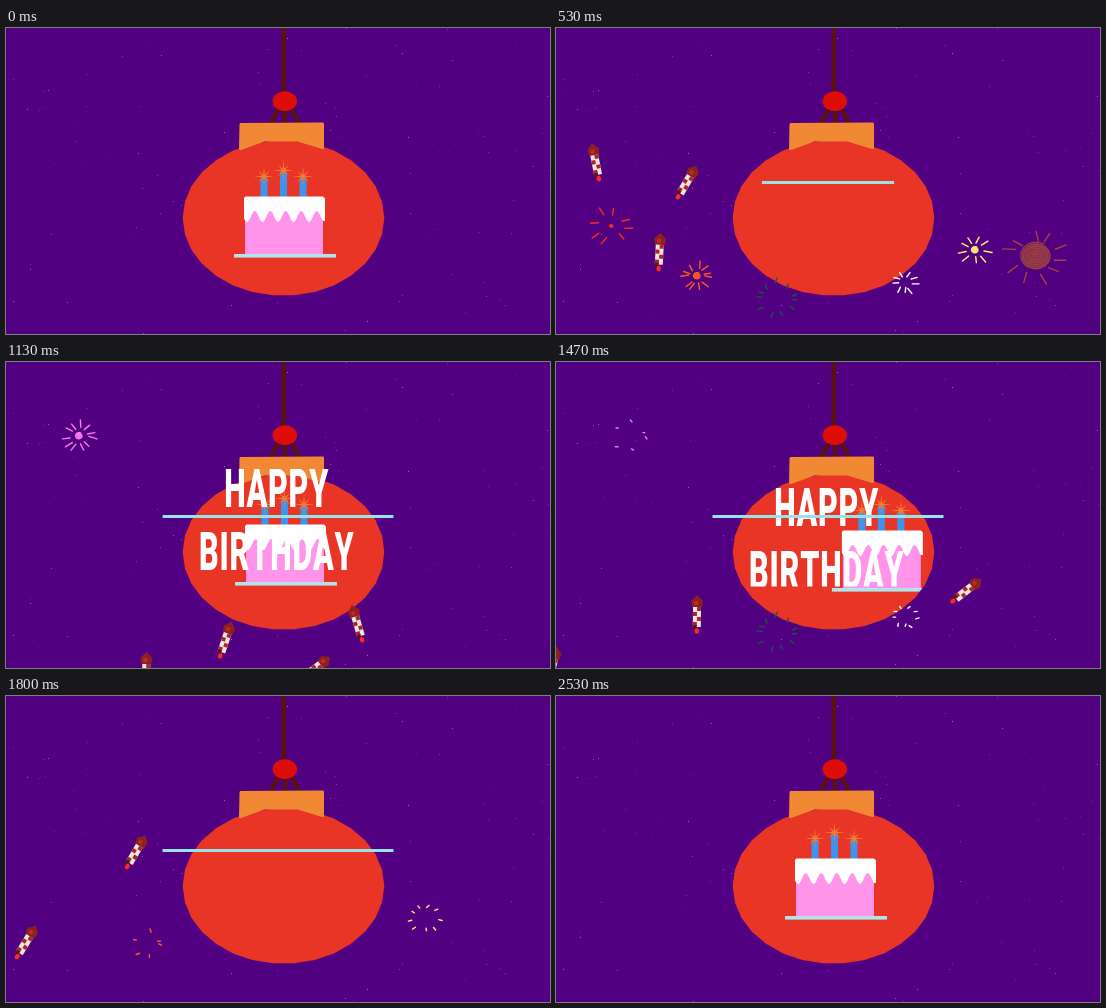
An HTML page with a canvas that plays this animation: 544x306 px, repeating every 2.59 s.

```html
<!DOCTYPE html>
<html lang="en">
<head>
<meta charset="utf-8">
<title>Happy Birthday</title>
<style>
  html, body { margin: 0; width: 100%; height: 100%; overflow: hidden; background: #520082; }
  canvas { display: block; width: 544px; height: 306px; }
</style>
</head>
<body>
<canvas id="stage" width="544" height="306"></canvas>
<script>
const ctx = document.getElementById('stage').getContext('2d');
const LOOP = 2590, STEP = 1000 / 15, HALF = LOOP / 2;
const HELD = [16, 28];
const BURST_LIFE = 430, FIRST_LAUNCH = 90, GROUND = 325, SQUASH = 0.88;
const TAU = Math.PI * 2;

const clamp = v => Math.min(1, Math.max(0, v));
const smooth = v => { v = clamp(v); return v * v * (3 - 2 * v); };
const mix = (a, b, u) => a + (b - a) * u;
const times = (n, make) => Array.from({ length: n }, (_, i) => make(i));
const polar = (x, y, a, rx, ry = rx) => [x + rx * Math.cos(a), y + ry * Math.sin(a)];

function seeded(seed) {
  return () => {
    seed = (seed * 1664525 + 1013904223) >>> 0;
    return seed / 4294967296;
  };
}

function trace(points) {
  ctx.beginPath();
  points.forEach(([x, y]) => ctx.lineTo(x, y));
}

function shape(color, points) {
  ctx.fillStyle = color;
  trace(points);
  ctx.fill();
}

function stroke(color, width, points) {
  ctx.strokeStyle = color;
  ctx.lineWidth = width;
  trace(points);
  ctx.stroke();
}

function oval(color, x, y, rx, ry = rx) {
  ctx.fillStyle = color;
  ctx.beginPath();
  ctx.ellipse(x, y, rx, ry, 0, 0, TAU);
  ctx.fill();
}

function rect(color, x, y, w, h) {
  ctx.fillStyle = color;
  ctx.fillRect(x, y, w, h);
}

const starRandom = seeded(41);
const stars = times(240, () => ({
  x: Math.floor(starRandom() * 544),
  y: Math.floor(starRandom() * 306),
  glow: 0.08 + starRandom() ** 4 * 0.5
}));

const bauble = times(30, i => polar(277.5, 190, i / 30 * TAU, 100.8, 77.8));

// A rocket rises from `from` on the ground, swaying sideways, and bursts at x, y.
const fireworks = [
  { color: '#f52a18', x: 55, y: 198, r: 24, rays: 8, core: 2, from: -8, sway: -12, flight: 740, bursts: [400, 2080] },
  { color: '#ff5a20', x: 141, y: 248, r: 17, rays: 11, core: 4, from: 140, sway: 0, flight: 450, bursts: [490, 1490] },
  { color: '#16564a', x: 222, y: 270, r: 23, rays: 11, core: 0, from: 204, sway: 0, flight: 400, bursts: [250, 1190] },
  { color: '#ffffff', x: 349, y: 254, r: 14, rays: 9, core: 0, from: 358, sway: 4, flight: 350, bursts: [480, 1170] },
  { color: '#ffee70', x: 419, y: 222, r: 18, rays: 9, core: 4, from: 285, sway: 0, flight: 440, bursts: [490, 1495] },
  { color: '#a0453c', x: 480, y: 228, r: 33, rays: 10, core: 16, from: 420, sway: 0, flight: 340, bursts: [430] },
  { color: '#3a35e6', x: 37, y: 121, r: 24, rays: 10, core: 2, from: 40, sway: 12, flight: 420, bursts: [560] },
  { color: '#22f060', x: 152, y: 120, r: 18, rays: 13, core: 0, from: 85, sway: -20, flight: 400, bursts: [600, 1870] },
  { color: '#ff78e8', x: 73, y: 74, r: 18, rays: 11, core: 4, from: 84, sway: 25, flight: 900, bursts: [1070] }
];

function drawRocket(x, y, angle) {
  ctx.save();
  ctx.translate(x, y);
  ctx.rotate(angle);
  shape('#8a2020', [[0, -19], [6, -13], [5, -7], [-5, -7], [-6, -13]]);
  rect('#c02a22', -3, -13, 4, 4);
  rect('#eee4e2', -4, -7, 8, 20);
  times(4, row => rect('#a82824', row % 2 ? -4 : 0, -7 + row * 5, 4, 4));
  rect('#5a1420', -4, 11, 4, 4);
  oval('#ff2a1c', 0, 17, 2.2, 2.8);
  ctx.restore();
}

function flyRocket(fw, u) {
  const x = mix(fw.from, fw.x, u) + fw.sway * Math.sin(Math.PI * u);
  const drift = fw.x - fw.from + fw.sway * Math.PI * Math.cos(Math.PI * u);
  drawRocket(x, mix(GROUND, fw.y, u), Math.atan2(drift, GROUND - fw.y));
}

function drawBurst(fw, u, seed) {
  const random = seeded(seed);
  const sparse = u > 0.72 && fw.core < 10;
  const inner = Math.max(0.48 + 0.45 * u, fw.core / fw.r + 0.15);
  times(fw.rays, i => {
    const a = (i + random() * 0.6) / fw.rays * TAU;
    const reach = fw.r * (0.8 + random() * 0.25);
    const bend = (random() - 0.5) * 0.3;
    if (sparse && i % 2) return;
    stroke(fw.color, 1.4, [
      polar(fw.x, fw.y, a + bend, reach * inner, reach * inner * SQUASH),
      polar(fw.x, fw.y, a, reach, reach * SQUASH)
    ]);
  });
  if (u < 0.35 && fw.core) drawScribble(fw);
}

function drawScribble({ color, x, y, core }) {
  const turns = 1.5 + core / 3;
  ctx.globalAlpha = 0.6;
  oval(color, x, y, core * 0.9, core * 0.8);
  ctx.globalAlpha = 1;
  stroke(color, 1.2, times(121, i => {
    const r = core * i / 120;
    return polar(x, y, i / 120 * turns * TAU, r, r * SQUASH);
  }));
}

function drawFireworks(t) {
  fireworks.forEach((fw, index) => fw.bursts.forEach(at => {
    const launch = Math.max(FIRST_LAUNCH, at - fw.flight);
    const rise = (t - launch) / (at - launch);
    const glow = (t - at) / BURST_LIFE;
    if (rise >= 0 && rise < 1) flyRocket(fw, rise);
    if (glow >= 0 && glow < 1) drawBurst(fw, glow, index * 97 + 13);
  }));
}

function drawOrnament() {
  rect('#5a120c', 275.5, 0, 4.5, 68);
  [-1, 0, 1].forEach(side =>
    stroke('#5a120c', 4.5, [[279 + side * 6, 80], [279 + side * 13.5, 94]]));
  oval('#de0d08', 278.8, 73.3, 12.2, 10);
  shape('#e83526', bauble);
  const cap = [[235, 96.5], [316.5, 96], [316.5, 119.5], [292, 112], [258, 112], [234.5, 120.5]];
  shape('#f08834', cap);
  stroke('#f08834', 3, [...cap, cap[0]]);
}

function drawSpark(x, y) {
  shape('#f07c34', times(16, i =>
    polar(x, y, i / 16 * TAU, i % 2 ? 2 : i % 4 ? 8 : 10.5)));
}

function drawCake(t) {
  const phase = t % HALF;
  const leaving = phase < HALF / 2;
  const x = leaving ? 48 * (phase / 172) ** 1.3
    : 1 - 91 * (Math.max(0, 1130 - phase) / 330) ** 1.37;
  ctx.save();
  trace(bauble);
  ctx.clip();
  ctx.translate(x, leaving ? 0 : -6);
  [-1, 0, 1].forEach(side => {
    const left = 274 + side * 19.5, top = 144 + Math.abs(side) * 6;
    rect('#3d94ee', left, top, 7, 170 - top);
    drawSpark(left + 3.5, top - 1.5);
  });
  rect('#ff94ea', 239, 182, 78, 45);
  const drips = times(80, i =>
    [317 - i, 188.5 + 5.5 * Math.cos((76 - i) / 15.5 * TAU)]);
  shape('#ffffff', [[239.5, 168.5], [317, 168.5], [319, 170.5], [319, 193], ...drips, [238, 170]]);
  rect('#b2e4ee', 228, 226, 102, 3.6);
  ctx.restore();
}

function drawTitle(t) {
  const drop = 117 * (1 - smooth((t - 580) / 420) + smooth((t - 1364) / 400));
  if (drop >= 117) return;
  ctx.save();
  ctx.beginPath();
  ctx.rect(0, 0, 544, 224.5);
  ctx.clip();
  ctx.translate(270.7, 145 + drop);
  ctx.scale(0.575, 1);
  ctx.font = '900 53px Roboto, "Open Sans", sans-serif';
  ctx.letterSpacing = '1.4px';
  ctx.fontKerning = 'none';
  ctx.textAlign = 'center';
  ctx.fillStyle = '#ffffff';
  ctx.fillText('HAPPY', 0, 0);
  ctx.fillText('BIRTHDAY', 0, 63);
  ctx.restore();
}

function drawRule(t) {
  const grown = 1 - (1 - clamp((t - 68) / 1076)) ** 1.5;
  const shrunk = clamp((t - 1800) / 700) ** 2.15;
  const half = 115.5 * (grown - shrunk);
  if (half > 1) rect('#98e2ea', 272 - half, 153, half * 2, 3);
}

function draw(t) {
  rect('#520082', 0, 0, 544, 306);
  stars.forEach(s => rect(`rgba(225,180,255,${s.glow})`, s.x, s.y, 1, 1));
  drawOrnament();
  drawFireworks(t);
  drawCake(t);
  drawTitle(t);
  drawRule(t);
}

ctx.lineCap = 'round';
ctx.lineJoin = 'round';
const start = performance.now();

function tick() {
  const t = (performance.now() - start) % LOOP;
  let step = Math.floor((t + 4) / STEP);
  if (HELD.includes(step)) step--;
  draw(Math.min(step, 38) * STEP);
  requestAnimationFrame(tick);
}
tick();
</script>
</body>
</html>
```
